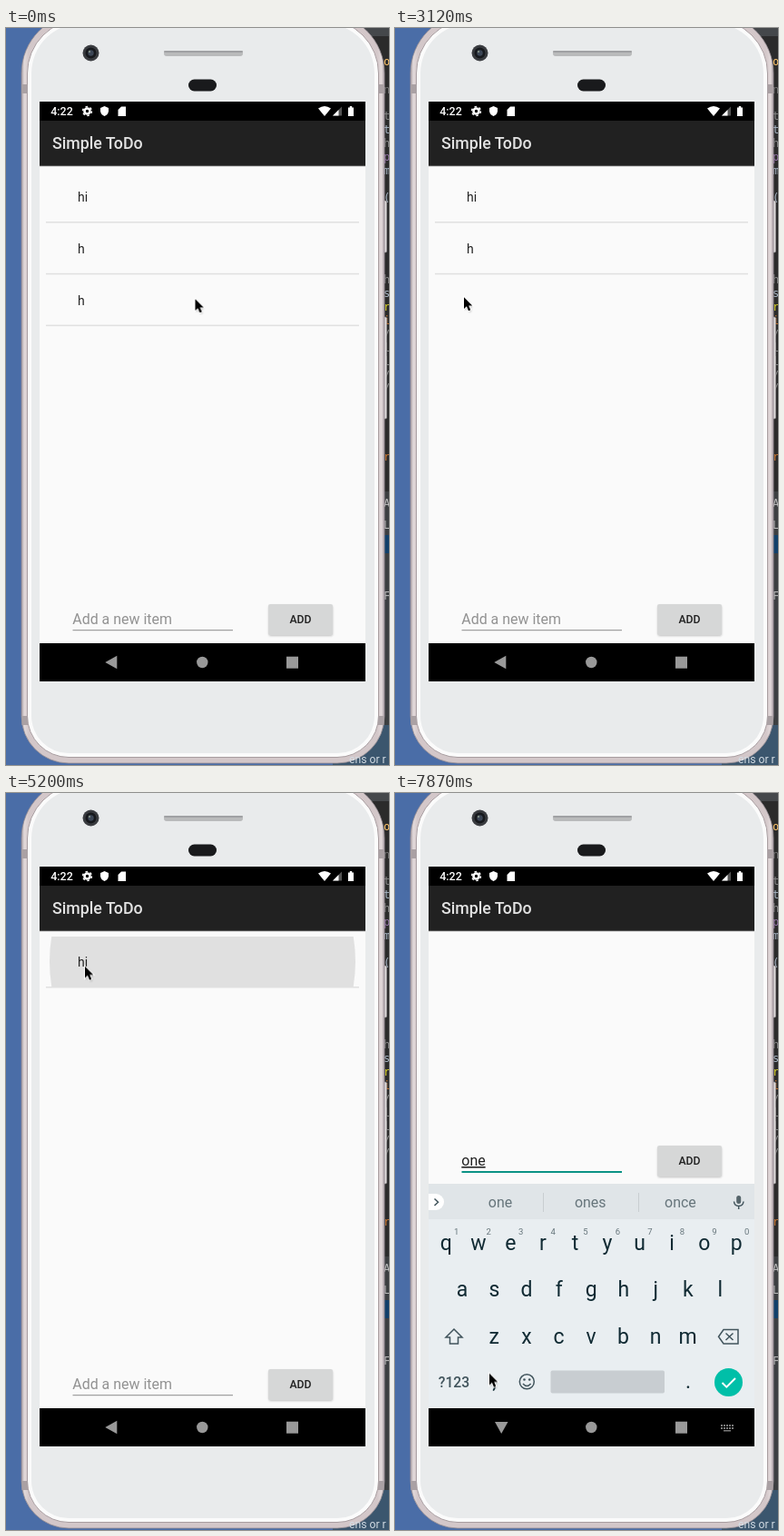
Write an HTML page that moves like this. It is 422 by 811 pixels and loops after 8000 ms.

```html
<!DOCTYPE html>
<html lang="en">
<head>
<meta charset="utf-8">
<title>Simple ToDo</title>
<style>
html, body { margin: 0; width: 100%; height: 100%; overflow: hidden; background: #4a6da7; }
svg { display: block; width: 422px; height: 811px; font-family: Roboto, sans-serif; }
.code { font: 12px "DejaVu Sans Mono", monospace; }
.mid { text-anchor: middle; }
.item { font-size: 14px; fill: #222; }
.field { font-size: 15.95px; }
.line { fill: none; stroke: #41545c; stroke-width: 1.5; }
.anim, .ripple circle { animation: 8s step-end infinite; }

.cursor { animation-name: cursor; }
@keyframes cursor {
  0% { transform: translate(208.5px, 298px); }
  9.25% { transform: translate(190px, 299px); }
  11.12% { transform: translate(140px, 299px); }
  13% { transform: translate(97px, 299px); }
  14.75% { transform: translate(82px, 299px); }
  24.12% { transform: translate(79px, 270px); }
  25.87% { transform: translate(79px, 252px); }
  27.75% { transform: translate(77px, 280px); }
  29.62% { transform: translate(76px, 296px); }
  40.87% { transform: translate(77px, 282px); }
  42.75% { transform: translate(80px, 256px); }
  44.62% { transform: translate(82px, 243px); }
  59.5% { transform: translate(79px, 222px); }
  61.37%, 72% { transform: translate(87px, 190.5px); }
  74.25% { transform: translate(89px, 290px); }
  76.12% { transform: translate(97px, 480px); }
  77.87% { transform: translate(103px, 610px); }
  79.75%, 100% { transform: translate(104px, 638.5px); }
}

.row1 { animation-name: row1; }
.row2 { animation-name: row2; }
.row3 { animation-name: row3; }
@keyframes row1 { 0% { opacity: 1; } 70.5%, 100% { opacity: 0; } }
@keyframes row2 { 0% { opacity: 1; } 53.87%, 100% { opacity: 0; } }
@keyframes row3 { 0% { opacity: 1; } 39%, 100% { opacity: 0; } }

.row1 .ripple circle { animation-name: press1; }
.row2 .ripple circle { animation-name: press2; }
.row3 .ripple circle { animation-name: press3; }
@keyframes press1 { 0% { r: 0; } 65% { r: 168.5px; } 66.87%, 100% { r: 180px; } }
@keyframes press2 { 0% { r: 0; } 48.25% { r: 168.5px; } 50.12%, 100% { r: 180px; } }
@keyframes press3 {
  0% { r: 0; opacity: 1; }
  18.5% { r: 168.5px; opacity: 1; }
  20.37% { r: 180px; opacity: .6; }
  22.25% { r: 180px; opacity: .2; }
  24.12% { r: 0; opacity: 1; }
  33.37% { r: 168.5px; opacity: 1; }
  35.25%, 100% { r: 180px; opacity: 1; }
}

.form { animation-name: form; }
@keyframes form { 0% { transform: none; } 83.37%, 100% { transform: translateY(-246px); } }
.blur { animation-name: blur; }
.focus { animation-name: focus; }
@keyframes blur { 0% { opacity: 1; } 79.75%, 100% { opacity: 0; } }
@keyframes focus { 0% { opacity: 0; } 79.75%, 100% { opacity: 1; } }
.hint { animation-name: hint; }
@keyframes hint { 0% { opacity: 1; } 89%, 100% { opacity: 0; } }
.t1 { animation-name: t1; }
.t2 { animation-name: t2; }
.t3 { animation-name: t3; }
@keyframes t1 { 0% { opacity: 0; } 89% { opacity: 1; } 90.87%, 100% { opacity: 0; } }
@keyframes t2 { 0% { opacity: 0; } 90.87% { opacity: 1; } 92.75%, 100% { opacity: 0; } }
@keyframes t3 { 0% { opacity: 0; } 92.75%, 100% { opacity: 1; } }
.caret { animation-name: caret; }
@keyframes caret {
  0% { opacity: 0; transform: none; }
  79.75% { opacity: 1; transform: none; }
  89% { opacity: 1; transform: translateX(9px); }
  90.87% { opacity: 1; transform: translateX(17.6px); }
  92.75% { opacity: 1; transform: translateX(26px); }
  98.37%, 100% { opacity: 0; transform: translateX(26px); }
}

.board { animation-name: board; }
@keyframes board {
  0% { opacity: 0; transform: translateY(290px); }
  83.37% { opacity: .2; transform: translateY(150px); }
  85.25% { opacity: .5; transform: translateY(61.5px); }
  87.12%, 100% { opacity: 1; transform: none; }
}
.nav { animation-name: nav; }
@keyframes nav { 0% { opacity: 1; } 83.37% { opacity: .53; } 87.12%, 100% { opacity: 1; } }
.icons { animation-name: icons; }
@keyframes icons { 0% { fill: #999; } 83.37% { fill: #dedede; } 87.12%, 100% { fill: #999; } }
.back { animation-name: back; }
.down { animation-name: down; }
@keyframes back { 0% { opacity: 1; } 83.37%, 100% { opacity: 0; } }
@keyframes down { 0% { opacity: 0; } 83.37%, 100% { opacity: 1; } }
</style>
</head>
<body>
<svg viewBox="0 0 422 811">
  <defs>
    <clipPath id="screen"><rect x="37" y="81" width="359" height="638"/></clipPath>
    <clipPath id="row"><rect x="44" y="158" width="345" height="55"/></clipPath>
    <linearGradient id="rim">
      <stop offset="0" stop-color="#a99fa5"/>
      <stop offset=".008" stop-color="#e2d9da"/>
      <stop offset=".02" stop-color="#d3c7c9"/>
      <stop offset=".98" stop-color="#d3c7c9"/>
      <stop offset=".992" stop-color="#e2d9da"/>
      <stop offset="1" stop-color="#a99fa5"/>
    </linearGradient>
    <filter id="soft" x="-30%" y="-30%" width="160%" height="160%"><feGaussianBlur stdDeviation="1"/></filter>
  </defs>

  <!-- desktop -->
  <rect width="422" height="811" fill="#4a6da7"/>
  <path d="M380 0H422V510H380Z" fill="#2b2b2b"/>
  <path d="M390 0H422V9H390Z" fill="#45484b"/>
  <path d="M380 510H422V811H380Z" fill="#3c3f41"/>
  <path d="M410 558H422V578H410Z" fill="#11406a"/>
  <path d="M360 767H422V811H360Z" fill="#3b566e"/>
  <g class="code" id="code"></g>

  <!-- phone -->
  <g fill="#dedbdb" stroke="#8d888a" stroke-width=".6">
    <rect x="414" y="190" width="5.500" height="57" rx="1.500"/>
    <rect x="414" y="318" width="5.500" height="112" rx="1.500"/>
  </g>
  <g id="shell"></g>
  <g fill="#aaa1a4">
    <path d="M17.500 62H24V72H17.500ZM410 62H416.500V72H410ZM17.500 757H24V767H17.500ZM410 757H416.500V767H410Z"/>
  </g>
  <circle cx="93.500" cy="27.500" r="9" fill="#3a3c40"/>
  <circle cx="93.500" cy="27.500" r="6" fill="#17191d"/>
  <circle cx="93.500" cy="27.500" r="3.200" fill="#3c4656"/>
  <circle cx="92" cy="26" r="1.200" fill="#7d8b80"/>
  <rect x="174" y="25" width="87" height="6" rx="3" fill="#b9babb"/>
  <rect x="174" y="25" width="87" height="2" rx="1" fill="#a0a1a3"/>
  <rect x="201" y="56.500" width="31" height="13" rx="6.500" fill="#191a1c"/>

  <g clip-path="url(#screen)">
    <rect x="37" y="81" width="359" height="638" fill="#fafafa"/>
    <rect x="37" y="152" width="359" height="1" fill="#dcdcdc"/>
    <rect x="37" y="151" width="359" height="1" fill="#505050"/>
    <rect x="37" y="102" width="359" height="49" fill="#212121"/>
    <rect x="37" y="81" width="359" height="21"/>

    <!-- status bar -->
    <g fill="#fff">
      <text x="49.300" y="96" font-size="12.400" font-weight="500">4:22</text>
      <circle cx="89.500" cy="91.500" r="3" fill="none" stroke="#fff" stroke-width="2.600"/>
      <circle cx="89.500" cy="91.500" r="4.900" fill="none" stroke="#fff" stroke-width="1.500" stroke-dasharray="2.500 2.630"/>
      <path d="M108.500 86L113 88V91.500Q112.500 95.500 108.500 97Q104.500 95.500 104 91.500V88Z"/>
      <path d="M127 86.500H132V97H123.500V90Z"/>
      <path d="M344 88.500Q351 83.500 358 88.500L351 97Z"/>
      <path d="M360 96.500L370 86.500V96.500Z" fill="#555"/>
      <path d="M360 96.500L366.500 90V96.500Z"/>
      <path d="M377 87.500H378.800V86H381.200V87.500H383V97H377Z"/>
    </g>
    <text x="51" y="133" font-size="17.800" font-weight="500" fill="#e2e2e2">Simple ToDo</text>

    <!-- list -->
    <g id="rows"></g>

    <!-- form -->
    <g class="anim form">
      <rect x="289.500" y="635.500" width="70.500" height="33.500" rx="2" fill="#999" opacity=".6" filter="url(#soft)"/>
      <rect x="289" y="634" width="71" height="34" rx="2" fill="#d6d7d7"/>
      <text class="mid" x="324.500" y="655" font-size="12.230" font-weight="500" fill="#222">ADD</text>
      <rect class="anim blur" x="73.500" y="662.200" width="176.500" height="1" fill="#8c8c8c"/>
      <rect class="anim focus" x="73.500" y="662" width="176.500" height="2" fill="#0b9285"/>
      <g class="field" fill="#222">
        <text class="anim hint" x="73.300" y="656" fill="#929292">Add a new item</text>
        <g text-decoration="underline">
          <text class="anim t1" x="73.300" y="656">o</text>
          <text class="anim t2" x="73.300" y="656">on</text>
          <text class="anim t3" x="73.300" y="656">one</text>
        </g>
      </g>
      <rect class="anim caret" x="73.200" y="639" width="1.700" height="22" fill="#0b9285"/>
    </g>

    <!-- keyboard -->
    <g class="anim board">
      <rect x="37" y="430" width="359" height="289" fill="#e9eef1"/>
      <rect x="37" y="430" width="359" height="39" fill="#e0e5e8"/>
      <path d="M37 441H45A9 9 0 0 1 45 459H37Z" fill="#fff"/>
      <path class="line" d="M43.500 446.500L47.500 450.300L43.500 454" stroke-width="1.800"/>
      <path d="M163.500 440V461M268.500 440V461" stroke="#c9ced1"/>
      <g class="field mid" id="words" fill="#66757b"></g>
      <rect x="376.200" y="443" width="5" height="9" rx="2.500" fill="#56656b"/>
      <path class="line" d="M373.500 449.500Q374 454.500 378.700 454.500Q383.400 454.500 384 449.500M378.700 454.500V458"/>
      <g class="mid" id="keys" fill="#102a33" font-size="23"></g>
      <path class="line" d="M65 590L74 599H69.500V606H60.500V599H56Z"/>
      <path class="line" d="M362 590.500H378V606H362L356.500 598.200ZM364.500 594.500L372.500 602M372.500 594.500L364.500 602"/>
      <text class="mid" x="65" y="654" font-size="15.720" font-weight="500" fill="#41545c">?123</text>
      <circle class="line" cx="145.300" cy="647.800" r="8"/>
      <path class="line" d="M141 650Q145.300 655 149.600 650"/>
      <g fill="#41545c"><circle cx="142.500" cy="645.500" r="1.300"/><circle cx="148.200" cy="645.500" r="1.300"/></g>
      <rect x="171.500" y="635.500" width="125.500" height="25" rx="2" fill="#c8cdd1"/>
      <circle cx="367.500" cy="648.500" r="15.500" fill="#00bfa8"/>
      <path d="M360.500 649L365.300 653.700L375 644" fill="none" stroke="#fff" stroke-width="2"/>
    </g>

    <!-- navigation -->
    <rect class="anim nav" x="37" y="677" width="359" height="42"/>
    <g class="anim icons">
      <path class="anim back" d="M109.300 698L122.300 690.800V705.200Z"/>
      <g class="anim down">
        <path d="M110 692H124.500L117.200 705Z"/>
        <path d="M359 695h2v2h-2zm3 0h2v2h-2zm3 0h2v2h-2zm3 0h2v2h-2zm3 0h2v2h-2zM359 698h2v2h-2zm3 0h2v2h-2zm3 0h2v2h-2zm3 0h2v2h-2zm3 0h2v2h-2zM362 701h8v1.500h-8z" opacity=".8"/>
      </g>
      <circle cx="216.300" cy="698" r="6.200"/>
      <rect x="309" y="691.700" width="13" height="13"/>
    </g>
  </g>

  <g class="anim cursor">
    <path d="M1 2V14.500L4 11.800L6 16.700L8.200 15.800L6.200 11H10Z" opacity=".3" filter="url(#soft)"/>
    <path d="M0 .3V13L2.900 10.300L5 15.200L7.300 14.300L5.200 9.400H9.200Z" stroke="#fff" stroke-width="1.800" paint-order="stroke"/>
  </g>
</svg>
<script>
const NS = "http://www.w3.org/2000/svg";
const byId = id => document.getElementById(id);

function add(parent, tag, attrs, text = "") {
  const node = document.createElementNS(NS, tag);
  for (const key in attrs) node.setAttribute(key, attrs[key]);
  node.textContent = text;
  return parent.appendChild(node);
}

// nested phone outlines: wide corners on top, tighter ones below
function shell(inset, paint) {
  const left = 17 + inset, right = 417 - inset, top = 66 - inset, low = 52 - inset;
  const corner = (r, dx, dy) => `a${r} ${r} 0 0 1 ${r * dx} ${r * dy}`;
  const d = `M${left} 50${corner(top, 1, -1)}H${right - top}${corner(top, 1, 1)}` +
    `V757${corner(low, -1, 1)}H${left + low}${corner(low, -1, -1)}Z`;
  add(byId("shell"), "path", { d, ...paint });
}
shell(0, { fill: "url(#rim)", stroke: "#958c92", "stroke-width": 0.8 });
shell(6.5, { fill: "#fbfbfb", stroke: "#a89da0" });
shell(11, { fill: "#e9ebec" });

// list rows, each with its own press ripple
["hi", "h", "h"].forEach((label, i) => {
  const row = add(byId("rows"), "g", { class: `anim row${i + 1}` });
  const body = add(row, "g", { transform: `translate(0 ${i * 56.8})` });
  const ripple = add(body, "g", { class: "ripple", "clip-path": "url(#row)" });
  add(ripple, "circle", { cx: 216.5, cy: 185.5, r: 0, fill: "#e0e0e0" });
  add(body, "rect", { x: 44, y: 213, width: 345, height: 1.5, fill: "#e0e0e0" });
  add(body, "text", { class: "item", x: 79, y: 191 }, label);
});

// letter keys
const PITCH = 35.55;
[["qwertyuiop", 56.3, 503], ["asdfghjkl", 74, 554], ["zxcvbnm", 109.3, 606]].forEach(([letters, x, y], r) => {
  [...letters].forEach((c, i) => {
    add(byId("keys"), "text", { x: x + i * PITCH, y }, c);
    if (r === 0) {
      add(byId("keys"), "text", { x: x + 11.3 + i * PITCH, y: 485.5, "font-size": 9.5, fill: "#66757b" }, (i + 1) % 10);
    }
  });
});
[[",", 109.5], [".", 323]].forEach(([c, x]) => add(byId("keys"), "text", { x, y: 655 }, c));

// suggestions for each typed prefix
[["hint", "thanks I we"], ["t1", "o of on"], ["t2", "on one only"], ["t3", "one ones once"]].forEach(([name, words]) => {
  const group = add(byId("words"), "g", { class: `anim ${name}` });
  words.split(" ").forEach((w, i) => add(group, "text", { x: 116 + i * 99.2, y: 456 }, w));
});

// editor text peeking out behind the phone
[
  ["o", 41, "#ffc66d"], ["n", 72, "#777"], ["t", 101, "#888"], ["t", 116, "#a9b7c6"], ["h", 131, "#888"],
  ["p", 146, "#9876aa"], ["m", 161, "#a9b7c6"], ["(", 191, "#a9b7c6"], ["h", 281, "#888"], ["s", 296, "#a9b7c6"],
  ["r", 311, "#d8d02a"], ["i", 326, "#cc7832"], ["/", 341, "#888"], ["l", 356, "#888"], ["l", 371, "#888"],
  ["/", 386, "#888"], ["/", 400, "#888"], ["r", 476, "#cc7832"], ["A", 527, "#bbb"], ["L", 551, "#bbb"], ["F", 629, "#bbb"]
].forEach(([c, y, fill]) => add(byId("code"), "text", { x: 416, y, fill }, c));
add(document.querySelector("svg"), "text", { x: 378, y: 808.5, "font-size": 12.2, fill: "#d3dce4" }, "ens or r");
</script>
</body>
</html>
```
